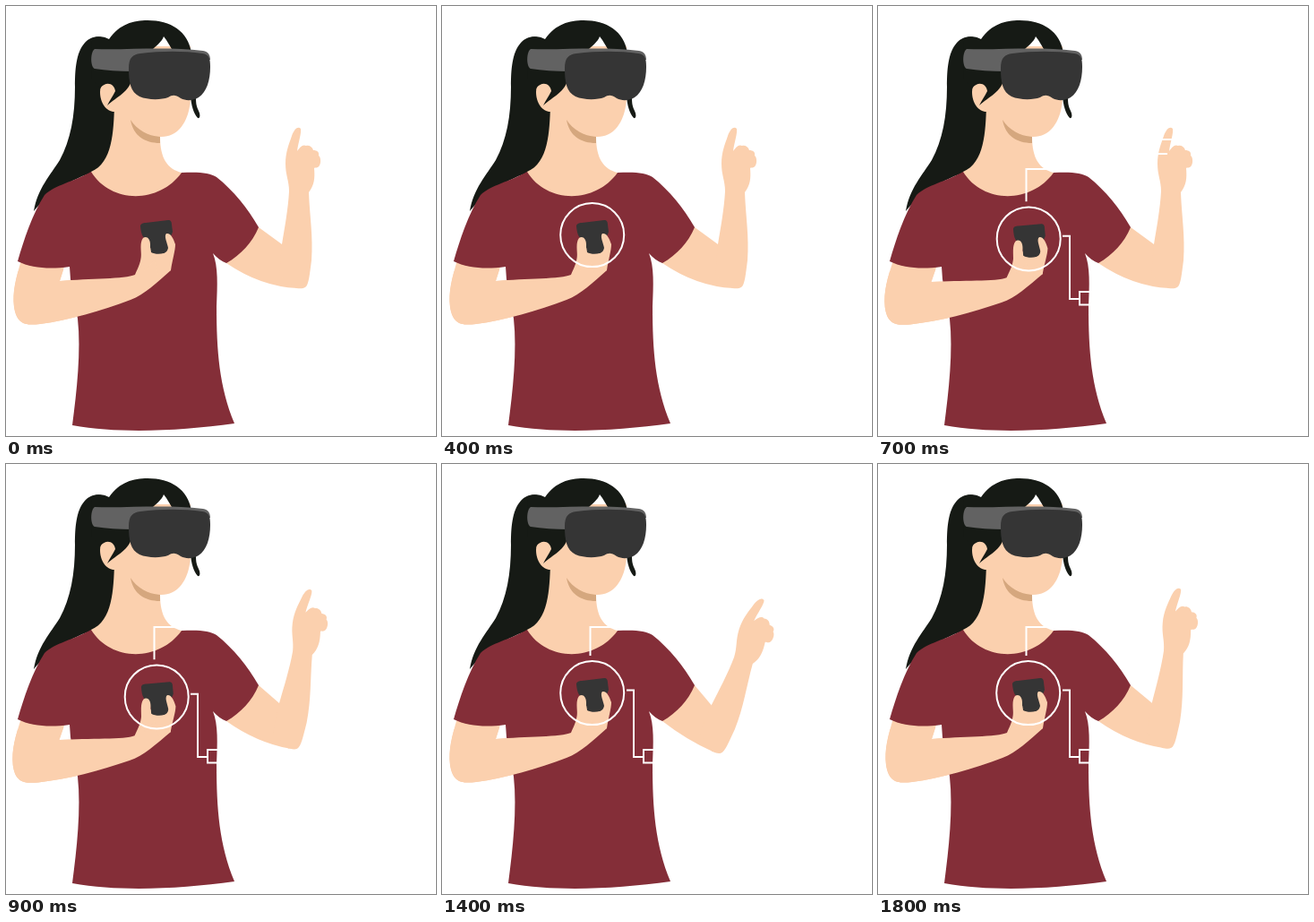
These frames come from a looping animation (480 by 480 pixels, 1.9 s). An HTML page with a canvas:

```html
<!DOCTYPE html>
<html lang="en">
<head>
<meta charset="utf-8">
<title>Headset gesture</title>
<style>
html, body { margin: 0; width: 100%; height: 100%; overflow: hidden; background: #fff; }
canvas { display: block; width: 100vmin; height: 100vmin; }
</style>
</head>
<body>
<canvas id="stage" width="480" height="480"></canvas>
<script>
const ctx = document.getElementById('stage').getContext('2d');
const LOOP = 1900;
const SKIN = '#fbd0ae', SHIRT = '#842e38', HAIR = '#161a15', SHADE = '#d5a77e', DARK = '#353535';

const shape = (color, d) => ({ color, path: new Path2D(d) });

const ponytail = shape(HAIR, `M114 39 C107 32 95 33 88 41 C78 52 77 72 77 90 C77 123 72 150 60 172
  C50 188 35 204 31 229 C43 214 66 196 96 186 L125 178 L125 60 Z`);

const skinBase = shape(SKIN, `M121 112 C120 140 119 175 95 185 L95 215 L200 215 L196 186
  C180 182 172 170 172 146 C190 147 204 132 206 104 L206 45 L130 45 L121 85
  C116 84 105 84 105 96 C105 108 112 118 121 118 Z`);

const jawShade = shape(SHADE, 'M139 127 C146 138 158 145 172 146 L172 153 C155 153 142 145 139 127 Z');

const shirt = shape(SHIRT, `M95 185 C117 221 171 221 196 186 C215 185 228 186 235 191
  C254 206 270 226 282 247 C275 264 262 278 246 287 C241 285 235 281 231 276
  C237 291 236 312 235 335 C235 385 238 425 255 466 C195 474 130 478 74 468
  C79 430 84 385 80 349 L72 305 L71 291 C50 294 29 293 13 285
  C20 261 29 233 43 211 C54 200 76 196 95 185 Z`);

const head = [
  shape(HAIR, `M96 36 C104 33 110 34 115 37 C127 20 142 16 158 16 C184 16 203 28 207 52
    L187 52 C184 46 180 39 176 34 C174 40 168 44 162 50 L141 80 C138 96 124 101 113 111
    C116 105 119 101 122 95 C121 87 112 83 105 92 L95 80 Z`),
  shape(HAIR, 'M206 101 C207 111 209 119 214 125 C217 126 217 121 215 117 C212 111 212 107 212 100 Z'),
  shape('#626262', `M99 48 C140 49 180 45 220 50 C226 51 228 55 228 60 L142 73
    C126 73 112 72 99 70 C94 68 94 51 99 48 Z`),
  shape(DARK, `M137 70 C137 58 141 54 150 53 C173 50 199 50 219 53 C227 54 228 59 228 68
    C228 83 224 96 215 102 C208 106 201 106 195 103 C189 99 186 99 181 102
    C173 105 158 105 149 101 C139 96 137 85 137 70 Z`)
];

const leftArm = [
  shape(SKIN, `M17 284 C11 304 7 319 9 336 C12 355 21 357 38 355 C70 351 107 340 139 328
    C155 322 168 309 184 295 L184 270 L151 270 C152 286 147 292 144 300
    C133 305 94 304 60 307 L66 288 Z`),
  shape(DARK, `M150 246 C150 243 153 242 156 242 L181 239 C184 239 185 241 185 244
    L186 252 C185 256 181 261 181 267 L181 274 C177 277 167 278 162 275 L160 262
    C153 260 151 256 150 246 Z`),
  shape(SKIN, `M151 282 C151 273 149 264 153 259 C157 256 161 260 161 266
    C161 275 161 279 166 283 L155 296 Z`),
  shape(SKIN, `M165 280 C175 277 180 276 181 270 C180 264 176 257 179 254 C184 253 187 260 189 266
    C189 273 186 282 184 295 L170 300 Z`)
];

// Forearm and hand, relative to the elbow
const forearm = shape(SKIN, `M-15 -29 C-12 -47 -8 -69 -7 -88 C-7 -100 -11 -106 -11 -119
  C-11 -132 -7 -141 -4 -150 C-1 -158 3 -161 6 -158 C7 -153 3 -142 2 -133
  C5 -137 8 -141 12 -139 C15 -140 19 -138 20 -134 C24 -134 27 -132 26 -128
  C29 -126 29 -117 25 -115 C23 -114 22 -115 21 -114 C22 -102 21 -95 15 -87
  C16 -60 20 -38 18 -11 C16 4 15 17 11 19 C8 21 4 20 1 20 L-18 5 Z`);

const fill = ({ color, path }) => {
  ctx.fillStyle = color;
  ctx.fill(path);
};

const mix = (a, b, k) => a + (b - a) * k;

function track(keys, t) {
  if (t <= keys[0][0]) return keys[0][1];
  for (let i = 1; i < keys.length; i++) {
    const [t0, a] = keys[i - 1], [t1, b] = keys[i];
    if (t <= t1) return mix(a, b, (t - t0) / (t1 - t0));
  }
  return keys[keys.length - 1][1];
}

const SWING = [[700, 0], [900, 6.9], [1200, 6.9], [1400, 17.5], [1500, 24], [1600, 27.3], [1700, 17], [1800, 5.1]];
const PRESS = [[500, 0], [700, 1], [900, 1], [1200, 0]];
const RING = [[0, 0], [400, 1]];
const LEADS = [[400, 0], [600, 1]];

// The picture advances in 100 ms steps, with three longer holds
function stepTime(ms) {
  const t = Math.floor((ms % LOOP) / 100) * 100;
  return [800, 1000, 1300].includes(t) ? t - 100 : t;
}

function drawRightArm(deg, t) {
  const k = deg / 27.3, a = deg * Math.PI / 180;
  const ex = mix(323, 297, k), ey = mix(295, 305, k);
  const at = (x, y) => [
    ex + x * Math.cos(a) - y * Math.sin(a),
    ey + x * Math.sin(a) + y * Math.cos(a)
  ];
  ctx.fillStyle = SKIN;
  ctx.beginPath();
  ctx.moveTo(270, 238);
  ctx.lineTo(282, 247);
  ctx.lineTo(...at(-15, -29));
  ctx.lineTo(...at(10, 0));
  ctx.lineTo(...at(2, 20));
  ctx.quadraticCurveTo(mix(284, 265, k), mix(313, 304, k), 246, 287);
  ctx.lineTo(240, 270);
  ctx.fill();

  ctx.save();
  ctx.translate(ex, ey);
  ctx.rotate(a);
  fill(forearm);
  ctx.restore();

  if (t === 700) {
    line([[310, 149], [330, 149]]);
    line([[310, 165], [323, 165]]);
  } else if (t === 1100 || t === 1200) {
    circle(336, 149, 8);
  } else if (t === 1600) {
    line([[366, 168], [370, 172], [375, 171]]);
  }
}

function line(points, part = 1) {
  let left = part * points.slice(1).reduce((sum, p, i) =>
    sum + Math.hypot(p[0] - points[i][0], p[1] - points[i][1]), 0);
  ctx.beginPath();
  ctx.moveTo(...points[0]);
  for (let i = 1; i < points.length && left > 0; i++) {
    const [x0, y0] = points[i - 1], [x1, y1] = points[i];
    const len = Math.hypot(x1 - x0, y1 - y0), k = Math.min(1, left / len);
    ctx.lineTo(mix(x0, x1, k), mix(y0, y1, k));
    left -= len;
  }
  ctx.stroke();
}

function circle(x, y, r) {
  ctx.beginPath();
  ctx.arc(x, y, r, 0, Math.PI * 2);
  ctx.stroke();
}

function drawLeftArm(press) {
  ctx.save();
  ctx.translate(20 - 1.7 * press, 350);
  ctx.rotate(press * 1.5 * Math.PI / 180);
  ctx.translate(-20, -350);
  leftArm.forEach(fill);
  ctx.restore();
}

function drawCallout(t, press) {
  const drop = 4.3 * press;
  const ring = track(RING, t), leads = track(LEADS, t);
  if (ring > 0) circle(167.7 + press * 0.5, 255.6 + drop, 35.5 * ring);
  if (leads > 0) {
    line([[165.5, 214 + drop], [165.5, 182], [200, 182]], leads);
    line([[206, 252.5 + drop], [214, 252.5 + drop], [214, 327], [225, 327]], leads);
  }
  if (leads === 1) ctx.strokeRect(225, 319, 15, 14.5);
}

function draw(now) {
  const t = stepTime(now), press = track(PRESS, t);
  ctx.fillStyle = '#fff';
  ctx.fillRect(0, 0, 480, 480);
  ctx.strokeStyle = '#fff';
  ctx.lineWidth = 2;

  fill(ponytail);
  fill(skinBase);
  fill(jawShade);
  drawRightArm(track(SWING, t), t);
  drawLeftArm(press);
  fill(shirt);
  head.forEach(fill);

  // Forearm passes in front of the shirt, the upper arm stays under the sleeve
  ctx.save();
  ctx.beginPath();
  ctx.rect(60, 230, 160, 130);
  ctx.rect(0, 296, 62, 64);
  ctx.clip();
  ctx.beginPath();
  ctx.rect(0, 294, 240, 70);
  ctx.rect(130, 230, 80, 70);
  ctx.clip();
  drawLeftArm(press);
  ctx.restore();

  drawCallout(t, press);
}

const start = performance.now();
function tick() {
  draw(performance.now() - start);
  requestAnimationFrame(tick);
}
tick();
</script>
</body>
</html>
```
